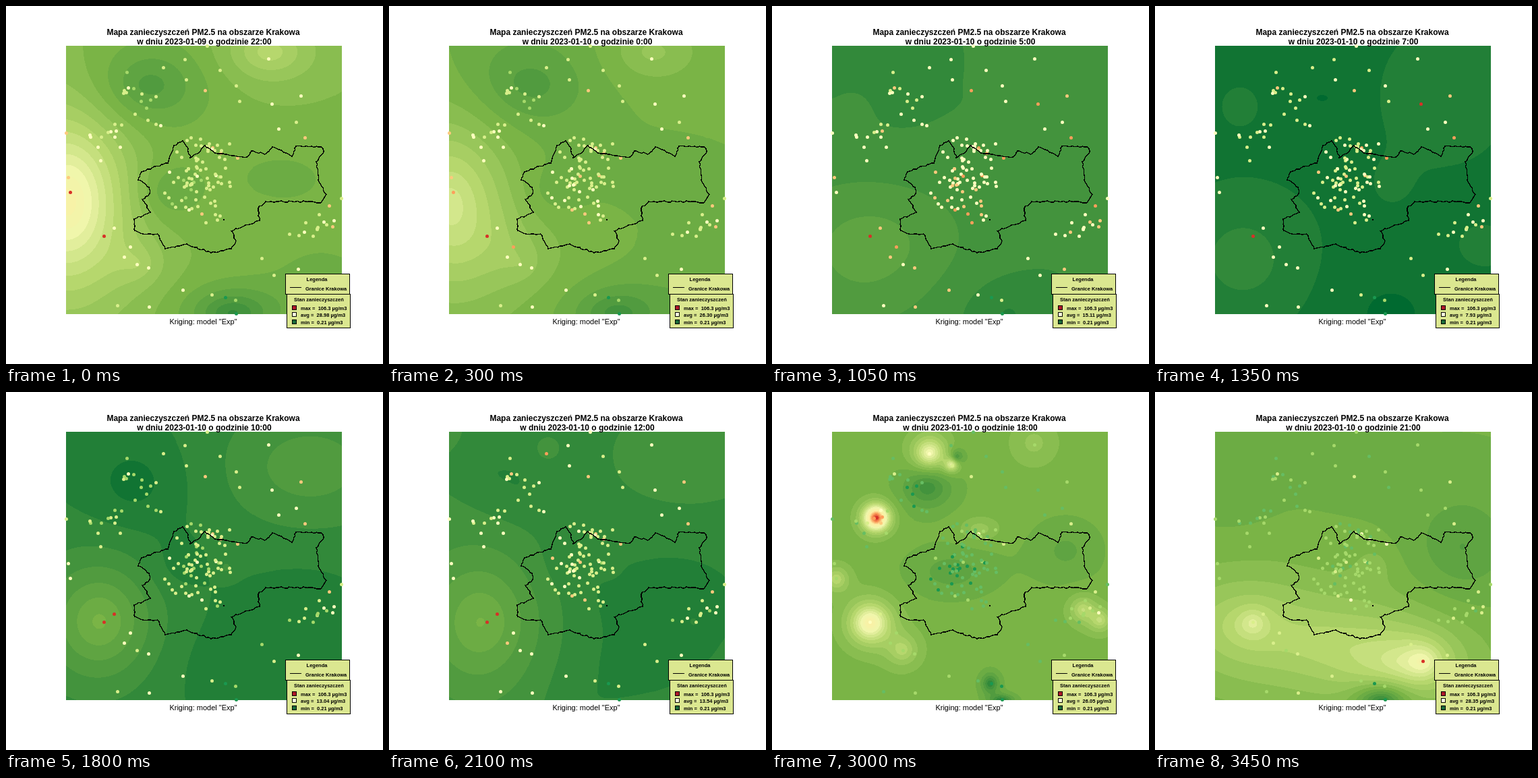
Animation, 559 px wide and 531 px high, one loop 3600 ms. Source, as an HTML page with a canvas:

```html
<!DOCTYPE html>
<html lang="pl">
<head>
<meta charset="utf-8">
<style>
html, body { margin: 0; width: 559px; height: 531px; overflow: hidden; background: #fff; }
canvas, svg { position: absolute; left: 0; top: 0; }
text { font-family: Arial, "Liberation Sans", sans-serif; white-space: pre; }
.title { font-size: 12px; font-weight: bold; text-anchor: middle; }
.small { font-size: 7.5px; font-weight: bold; }
.box { fill: #dbe790; stroke: #000; }
.mid { text-anchor: middle; }
</style>
</head>
<body>
<canvas id="map" width="559" height="531"></canvas>
<svg width="559" height="531">
  <path id="city" fill="none" stroke="#000" stroke-width="1.4" shape-rendering="crispEdges"/>
  <rect x="322" y="316" width="2" height="2"/>
  <text class="title" x="292.5" y="43">Mapa zanieczyszczeń PM2.5 na obszarze Krakowa</text>
  <text class="title" id="date" x="294" y="57"></text>
  <text class="mid" x="292.5" y="472" font-size="11">Kriging: model "Exp"</text>
  <rect class="box" x="414.5" y="397.5" width="95" height="30"/>
  <text class="small mid" x="461" y="408">Legenda</text>
  <path d="M421 417.5h17" stroke="#000"/>
  <text class="small" x="444" y="422">Granice Krakowa</text>
  <rect class="box" x="416.5" y="427.5" width="94" height="50"/>
  <text class="small" x="427" y="438">Stan zanieczyszczeń</text>
  <g stroke="#000">
    <rect x="424.5" y="444.5" width="6" height="6" fill="#b0182b"/>
    <rect x="424.5" y="454.5" width="6" height="6" fill="#ffffe0"/>
    <rect x="424.5" y="465.5" width="6" height="6" fill="#1a6b3a"/>
  </g>
  <text class="small" x="437" y="451">max =  106.3 µg/m3</text>
  <text class="small" id="avg" x="437" y="461"></text>
  <text class="small" x="437" y="472">min =  0.21 µg/m3</text>
</svg>
<script>
const X0 = 89, Y0 = 59, W = 409, H = 398, STEP = 150, STEPS = 24;
const TOP_BAND = 28, BANDS_PER_COLOR = 4;
const ramp = [0x006a30, 0x43933d, 0x7ab446, 0xb6d76d, 0xf0f6ab, 0xfdeea2, 0xf99655, 0xd02a27];
const dotColors = ['#006837', '#1a9850', '#66bd63', '#a6d96a', '#d9ef8b', '#ffffbf',
  '#fdc97d', '#fd9f5b', '#f46d43', '#d73027'];

// Outlying stations; the last two always read lowest.
const outposts = [[298,59], [265,79], [233,91], [179,98], [267,109], [317,95], [341,118],
  [389,78], [295,125], [346,141], [394,145], [437,133], [430,172], [404,182], [443,195],
  [89,188], [140,229], [92,254], [95,276], [145,341], [160,329], [184,357], [175,372],
  [194,383], [211,388], [262,421], [305,428], [379,374], [397,399], [433,390], [340,436],
  [165,444], [212,446], [497,285], [155,186], [275,264], [296,321], [325,432], [341,456]];

// Clusters of stations: centre, half size, count.
const towns = [[285,262, 62,72, 70], [305,208, 42,12, 14], [180,152, 60,35, 16],
  [140,198, 40,20, 8], [455,325, 50,45, 14]];

const border = [[201,246], [220,238], [240,233], [249,207], [262,200], [270,211], [273,225],
  [284,219], [295,207], [310,218], [336,222], [358,224], [364,215], [384,220], [395,209],
  [408,214], [424,223], [430,208], [468,209], [471,217], [460,231], [463,258], [475,279],
  [467,292], [444,290], [385,290], [374,300], [376,318], [334,334], [341,348], [334,360],
  [304,366], [268,353], [236,360], [225,338], [203,338], [191,333], [190,316], [214,306],
  [202,287], [213,278], [212,269], [196,258]];

// Known hours. Field bumps: x, y, width, height, bands up or down.
// Dots: colour at the middle band, that band, colours per band. Hot: red stations.
const hours = [
  { step: 0, avg: 28.98, base: 8.9, dots: [4, 8.5, .25], hot: [[95,276], [145,341]],
    bumps: [[90,290, 80,120, 9.8], [210,118, 80,60, -3.8], [390,68, 60,40, 3.8],
      [240,275, 50,45, -2.3], [410,255, 90,50, -1.3], [335,455, 60,35, -5],
      [470,410, 80,60, -1.6], [195,382, 35,30, 1.8]] },
  { step: 5, avg: 22.29, base: 7.1, dots: [5, 7, .3],
    hot: [[145,341], [184,357], [275,264], [296,321]],
    bumps: [[175,95, 120,105, -2], [155,350, 130,88, 3.1], [350,455, 70,50, -2.1],
      [460,360, 100,90, -.7]] },
  { step: 9, avg: 7.93, base: 1.5, dots: [4.1, 1.5, .7], hot: [[394,145], [145,341]],
    bumps: [[430,130, 105,115, 1.2], [350,265, 35,40, .5], [130,375, 95,95, 2.1],
      [125,147, 30,32, 1], [248,136, 22,12, -.8], [345,455, 72,60, -.8],
      [488,358, 48,38, .9]] },
  { step: 12, avg: 13.04, base: 3.1, dots: [3.7, 3, .45], hot: [[145,341], [160,329]],
    bumps: [[190,135, 75,70, -1.8], [450,110, 130,90, 2.7], [138,340, 78,85, 5.2],
      [326,260, 12,12, 1.2], [255,255, 40,40, -.9], [330,400, 110,80, -.8],
      [440,295, 80,50, -.6]] },
  { step: 16, avg: 14.04, base: 4.2, dots: [4, 3.5, .4],
    hot: [[233,91], [145,341], [160,329]],
    bumps: [[233,85, 22,22, 1.9], [89,59, 60,70, .9], [150,118, 40,40, -.9],
      [130,345, 105,150, 3.9], [420,310, 150,170, -1.8], [498,100, 70,70, -.6],
      [320,300, 60,60, -.7], [450,339, 14,14, .8], [290,457, 60,50, -.8]] },
  { step: 20, avg: 26.05, base: 8.5, dots: [2, 8.5, .3], hot: [[155,186]],
    bumps: [[154,186, 16,16, 20], [233,90, 22,22, 9], [266,107, 10,10, 8],
      [145,342, 27,27, 11], [95,277, 17,17, 4.5], [193,382, 22,22, 4], [460,322, 18,18, 4.5],
      [486,338, 16,16, 4.5], [307,203, 25,15, 2.5], [388,75, 30,30, 2],
      [230,140, 35,30, -4.5], [273,96, 10,10, -5], [265,266, 60,35, -2.2],
      [435,235, 50,45, -1.8], [323,432, 12,14, -5.5], [340,457, 16,8, -6]] },
  { step: 23, avg: 28.35, base: 8.1, dots: [2.8, 9, .22], hot: [[397,399]],
    bumps: [[110,140, 70,70, -.8], [285,115, 60,45, -.8], [455,230, 75,80, -2.2],
      [325,255, 30,30, 1.2], [125,345, 100,75, 3.5], [145,342, 20,20, 3],
      [250,370, 130,70, 2.6], [360,400, 95,60, 5], [397,400, 28,25, 4.8],
      [335,457, 35,22, -7]] }
];

const rand = n => { const s = Math.sin(n * 127.1 + 11.7) * 43758.5453; return s - Math.floor(s); };
const clamp = (v, max) => Math.max(0, Math.min(max, v));
const lerp = (a, b, t) => a + (b - a) * t;
const byId = id => document.getElementById(id);

const stations = [...outposts];
for (const [x, y, rx, ry, count] of towns)
  for (let i = 0; i < count; i++) {
    const spread = k => rand(stations.length * 4 + k) + rand(stations.length * 4 + k + 1) - 1;
    stations.push([Math.round(x + rx * spread(0)), Math.round(y + ry * spread(2))]);
  }

function level({ base, bumps }, x, y) {
  let sum = base;
  for (const [cx, cy, rx, ry, rise] of bumps) {
    const q = ((x - cx) / rx) ** 2 + ((y - cy) / ry) ** 2;
    if (q < 12) sum += rise * Math.exp(-(q ** .75));
  }
  return sum;
}

for (const hour of hours) {
  hour.grid = Float32Array.from({ length: W * H },
    (_, i) => level(hour, X0 + i % W, Y0 + Math.floor(i / W)));
  const [color, mid, gain] = hour.dots;
  hour.classes = stations.map(([x, y], i) => {
    if (hour.hot.some(([u, v]) => u === x && v === y)) return 9;
    if (i >= outposts.length - 2 && i < outposts.length) return 1;
    const noise = rand(i) - .5 + 2 * rand(i + .5) ** 8;
    return clamp(Math.round(color + gain * (level(hour, x, y) - mid) + noise), 7);
  });
}

function cityPath() {
  let d = 'M' + border[0], seed = 0;
  border.forEach(([ax, ay], i) => {
    const [bx, by] = border[(i + 1) % border.length];
    const n = Math.ceil(Math.hypot(bx - ax, by - ay) / 4);
    for (let k = 1; k <= n; k++) {
      const jitter = () => k < n ? (rand(++seed) - .5) * 2.6 : 0;
      d += `L${lerp(ax, bx, k / n) + jitter()} ${lerp(ay, by, k / n) + jitter()}`;
    }
  });
  return d + 'Z';
}

// Packed ABGR colour of each band.
const inks = Array.from({ length: TOP_BAND + 1 }, (_, band) => {
  const i = Math.min(Math.floor(band / BANDS_PER_COLOR), ramp.length - 2);
  const part = shift => Math.round(lerp(ramp[i] >> shift & 255, ramp[i + 1] >> shift & 255,
    band / BANDS_PER_COLOR - i));
  return (255 << 24 | part(0) << 16 | part(8) << 8 | part(16)) >>> 0;
});

const ctx = byId('map').getContext('2d');
const image = ctx.createImageData(W, H);
const pixels = new Uint32Array(image.data.buffer);
byId('city').setAttribute('d', cityPath());

function draw(step) {
  let k = hours.length - 2;
  while (hours[k].step > step) k--;
  const a = hours[k], b = hours[k + 1];
  const t = (step - a.step) / (b.step - a.step);

  for (let i = 0; i < pixels.length; i++)
    pixels[i] = inks[Math.floor(clamp(lerp(a.grid[i], b.grid[i], t), TOP_BAND))];
  ctx.clearRect(0, 0, 559, 531);
  ctx.putImageData(image, X0, Y0);
  stations.forEach(([x, y], i) => {
    ctx.fillStyle = dotColors[Math.round(lerp(a.classes[i], b.classes[i], t))];
    ctx.beginPath();
    ctx.arc(x + .5, y + .5, 2.5, 0, 7);
    ctx.fill();
  });
  byId('date').textContent =
    `w dniu 2023-01-${step < 2 ? '09' : '10'} o godzinie ${(22 + step) % 24}:00`;
  byId('avg').textContent = `avg =  ${lerp(a.avg, b.avg, t).toFixed(2)} µg/m3`;
}

let shown = 0;
const start = performance.now();
draw(0);
function tick() {
  const step = Math.floor((performance.now() - start) / STEP) % STEPS;
  if (step !== shown) draw(shown = step);
  requestAnimationFrame(tick);
}
requestAnimationFrame(tick);
</script>
</body>
</html>
```
